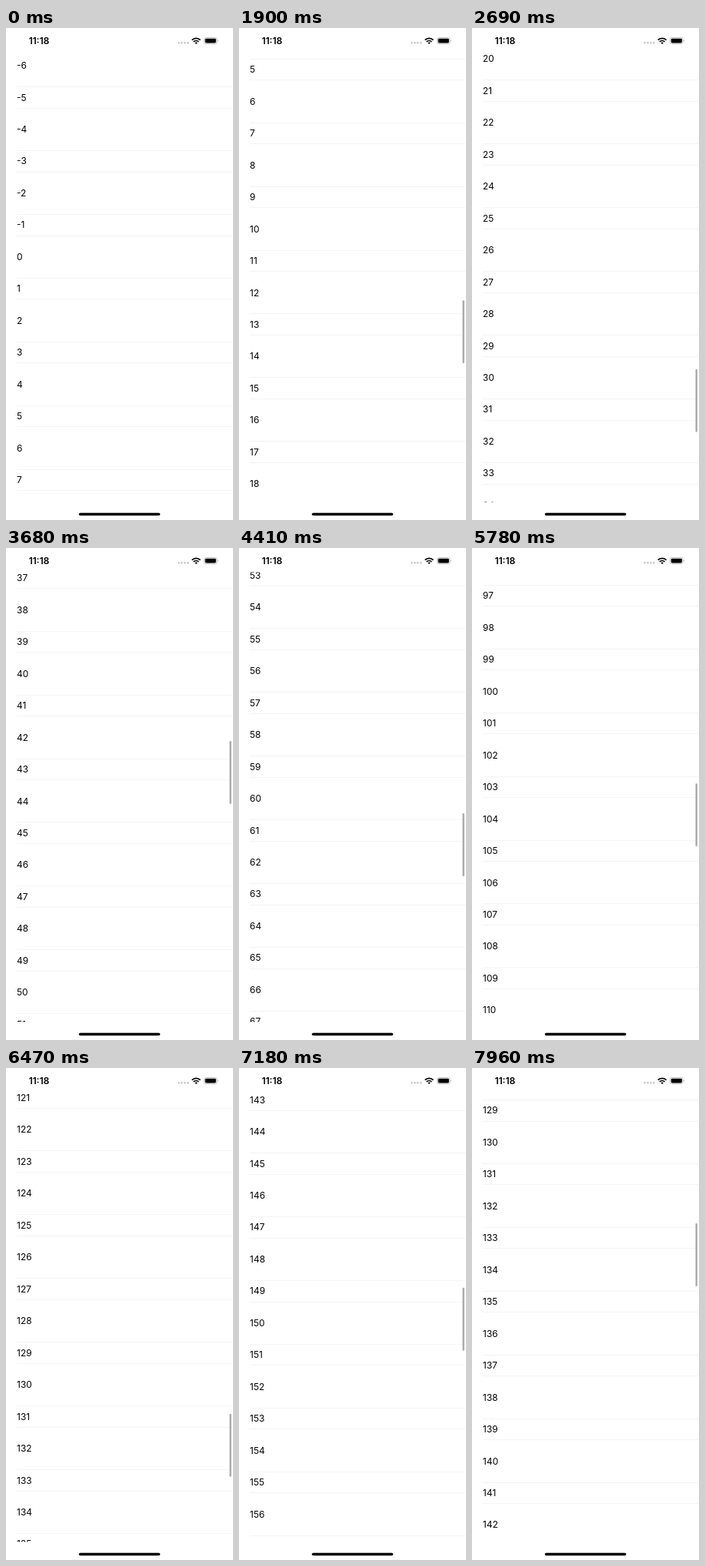
An HTML page for the animation above (8 s loop, 296 by 640 pixels).

```html
<!DOCTYPE html>
<html lang="en">
<head>
<meta charset="utf-8">
<title>Endless list</title>
<style>
  html, body { margin: 0; width: 100%; height: 100%; overflow: hidden; background: #fff; }
  svg { display: block; width: 296px; height: 640px; }
  text { font: 12px Inter, "Liberation Sans", sans-serif; fill: #000; }
  .clock { font-weight: 600; }
</style>
</head>
<body>
<svg viewBox="0 0 296 640">
  <clipPath id="view"><rect y="31.5" width="296" height="585"/></clipPath>
  <g id="list" clip-path="url(#view)"></g>
  <rect id="bar" x="291.5" width="2.3" height="82" rx="1.15" fill="#a6a6a6"/>

  <text class="clock" x="29.7" y="20.8">11:18</text>
  <path d="M225.3 19.3h12" stroke="#c4c4c4" stroke-width="2.6" stroke-linecap="round" stroke-dasharray="0 3.9"/>
  <g fill="none" stroke="#000" stroke-width="1.7">
    <path d="M242.5 15.7a7.7 7.7 0 0 1 10.9 0"/>
    <path d="M244.6 17.9a4.7 4.7 0 0 1 6.7 0"/>
  </g>
  <path d="M246.2 19.3a2.5 2.5 0 0 1 3.5 0L247.95 21z"/>
  <rect x="258.4" y="12.5" width="16.6" height="8.2" rx="2.4" fill="none" stroke="#b4b4b4" stroke-width=".8"/>
  <rect x="259.6" y="13.7" width="14.2" height="5.8" rx="1.4"/>
  <path d="M275.9 15.2q1 .4 1 1.4t-1 1.4z" fill="#b4b4b4"/>
  <rect x="95" y="630.7" width="106" height="3.5" rx="1.75"/>
</svg>
<script>
const LOOP = 8000, REFRESH = 110, REST = 135;
const PITCH = 41.469, ZERO_Y = 297.7, TOP = 31.5, POOL = 17;
const PAGE = 50 * PITCH;

// Each swipe starts at one point and comes to rest at the next: [time, scroll]
const swipes = [
  [1170, 0], [1900, 451], [2690, 1087], [3680, 1793], [4410, 2460],
  [5100, 3126], [5910, 4262], [6610, 5283], [7520, 6250], [8100, 5585.5]
];

// Quick start, long glide
function ease(p) {
  const q = 1 - (1 - p) ** 2;
  return q * q * (3 - 2 * q);
}

function stateAt(t) {
  const i = swipes.findLastIndex(([start]) => start <= t);
  if (i < 0) return { scroll: 0, pages: 0, moving: false };
  const [start, from] = swipes[i], [end, to] = swipes[i + 1];
  const elapsed = Math.min(t, end - REST) - start;
  const beat = REFRESH * Math.floor(elapsed / REFRESH);
  const scroll = from + (to - from) * ease(beat / (end - start));
  // 50 more rows are loaded whenever the last one comes into view
  const pages = Math.floor((Math.max(from, scroll) - 1700) / PAGE) + 1;
  return { scroll, pages: Math.max(0, pages), moving: true };
}

function make(tag, parent, attrs) {
  const el = document.createElementNS("http://www.w3.org/2000/svg", tag);
  for (const k in attrs) el.setAttribute(k, attrs[k]);
  return parent.appendChild(el);
}

const list = document.getElementById("list");
const bar = document.getElementById("bar");
const rows = Array.from({ length: POOL }, () => ({
  label: make("text", list, { x: 14 }),
  line: make("rect", list, { x: 14, width: 281, height: 1, fill: "#f4f4f4" })
}));

function draw({ scroll, pages, moving }) {
  const first = Math.floor((TOP - ZERO_Y + scroll) / PITCH) - 1;
  rows.forEach(({ label, line }, i) => {
    const n = first + i;
    const y = ZERO_Y + n * PITCH - scroll;
    const half = PITCH / (n % 2 ? 3 : 1.5); // even rows are twice as tall
    label.textContent = n;
    label.setAttribute("y", y + 4.2);
    line.setAttribute("y", Math.floor(y + half));
  });
  bar.setAttribute("y", 290.6 + 0.1409 * (scroll - pages * PAGE));
  bar.setAttribute("visibility", moving ? "visible" : "hidden");
}

const start = performance.now();
function tick() {
  draw(stateAt((performance.now() - start) % LOOP));
  requestAnimationFrame(tick);
}
tick();
</script>
</body>
</html>
```
